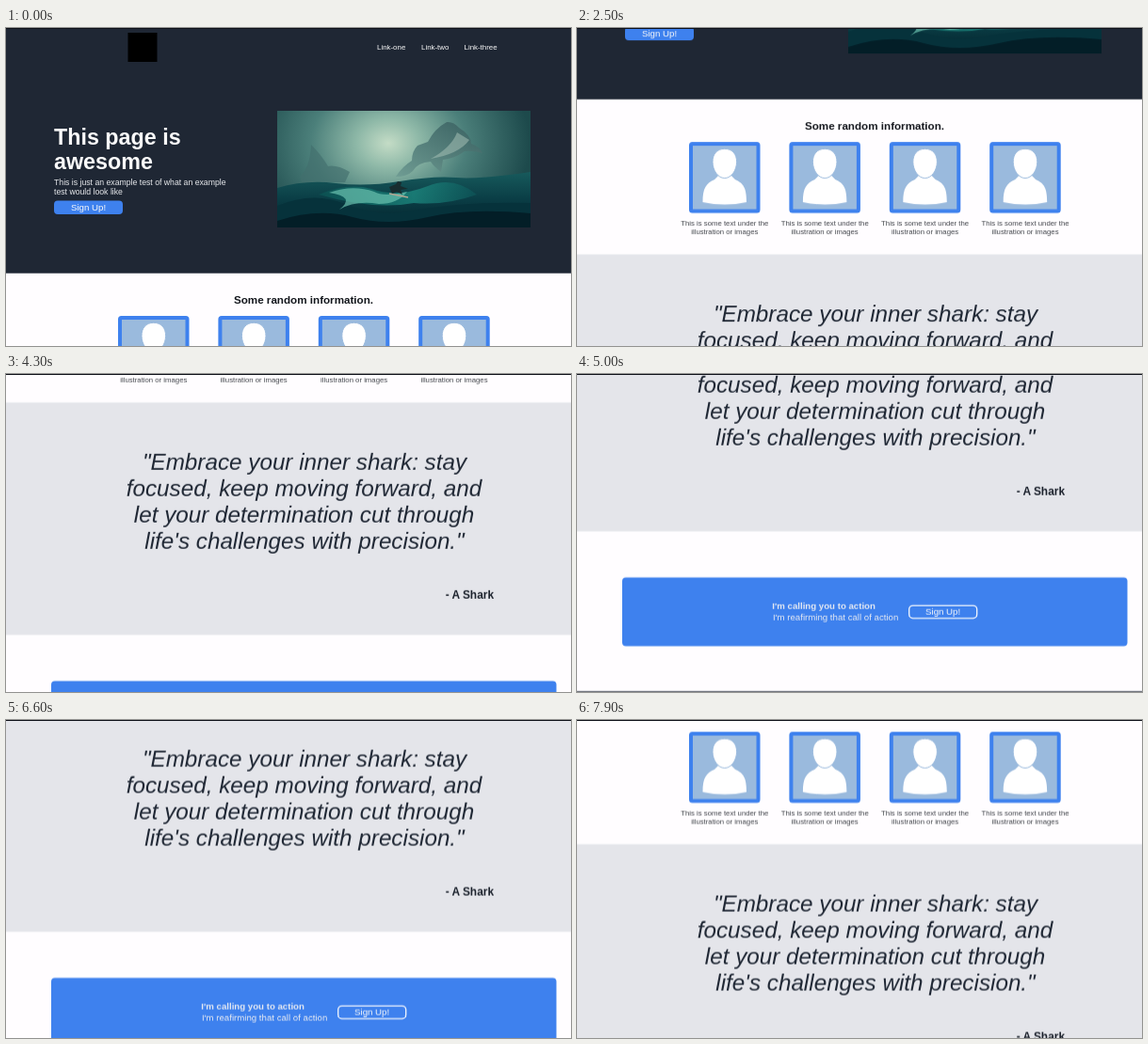
These frames come from a looping animation (600 px wide and 338 px high, 8 s). An HTML page:

```html
<!DOCTYPE html>
<html lang="en">
<head>
<meta charset="utf-8">
<title>Scrolling landing page</title>
<style>
  html, body { margin: 0; width: 100%; height: 100%; overflow: hidden; background: #fffdff; }
  #stage { position: relative; width: 600px; height: 338px; overflow: hidden; }
  #page { display: block; will-change: transform; }
  #edge { position: absolute; inset: 0 0 auto; height: 1px; background: #0e1119; }
  text { font-family: "Liberation Sans", Arial, sans-serif; }
  .light { fill: #fafafa; }
  .mid { text-anchor: middle; }
  .bold { font-weight: bold; }
  .small { font-size: 7.9px; }
  .title { font-size: 23.3px; }
  .lead { font-size: 8.7px; fill: #e8eaed; }
  .button { font-size: 9.7px; }
  .heading { font-size: 11.65px; fill: #14171d; }
  .caption { font-size: 7.75px; fill: #41444a; }
  .quote { font-size: 24.25px; font-style: italic; fill: #1f2734; }
  .author { font-size: 11.9px; text-anchor: end; fill: #1a202b; }
  .call { font-size: 9.66px; fill: #e5e9f2; }
  .footer { font-size: 7.75px; }
</style>
</head>
<body>
<div id="stage">
<svg id="page" width="600" height="882" viewBox="0 0 600 882">
  <defs>
    <radialGradient id="sky" gradientUnits="userSpaceOnUse" cx="118" cy="34" r="150" gradientTransform="translate(0 8) scale(1 .78)">
      <stop offset="0" stop-color="#c4dcc6"/>
      <stop offset=".22" stop-color="#8fb9a8"/>
      <stop offset=".55" stop-color="#4b7f7a"/>
      <stop offset="1" stop-color="#1d4a4c"/>
    </radialGradient>
    <linearGradient id="sea" x1="0" y1="0" x2="0" y2="1">
      <stop offset="0" stop-color="#175a5c"/>
      <stop offset=".5" stop-color="#0a3d45"/>
      <stop offset="1" stop-color="#04222b"/>
    </linearGradient>
    <linearGradient id="shark" x1="0" y1="1" x2="1" y2="0">
      <stop offset="0" stop-color="#6f9c93"/>
      <stop offset="1" stop-color="#385f60"/>
    </linearGradient>
    <linearGradient id="wave" x1="0" y1="0" x2="1" y2="0">
      <stop offset="0" stop-color="#0b5554"/>
      <stop offset=".6" stop-color="#1f9186"/>
      <stop offset="1" stop-color="#0d5558"/>
    </linearGradient>
    <clipPath id="frame"><rect width="269" height="124"/></clipPath>
    <g id="avatar">
      <rect x="2" y="2" width="71.5" height="71.5" rx="1.5" fill="#9abadd" stroke="#3e81ee" stroke-width="4"/>
      <path d="M14.5 64C14.5 49 18 44 27 40L31 36H45L49 40C58 44 61 49 61 64Q38 69 14.5 64Z" fill="#fff"/>
      <path d="M37.8 7.3C46 7.3 50.8 13 50.6 21.5C50.4 30 45 38.5 37.8 38.5S25.2 30 25 21.5C24.8 13 29.6 7.3 37.8 7.3Z" fill="#fff" stroke="#9abadd"/>
    </g>
  </defs>

  <rect width="600" height="882" fill="#fffdff"/>
  <rect width="600" height="260.7" fill="#1f2734"/>
  <rect x="129.5" y="5" width="31" height="31" fill="#000"/>
  <g class="small light">
    <text x="394" y="23">Link-one</text>
    <text x="441" y="23">Link-two</text>
    <text x="486.5" y="23">Link-three</text>
  </g>
  <g class="title bold light">
    <text x="51" y="123.7">This page is</text>
    <text x="51" y="150.3">awesome</text>
  </g>
  <text class="lead" x="51" y="167">This is just an example test of what an example</text>
  <text class="lead" x="51" y="177">test would look like</text>
  <rect x="51" y="183.5" width="73" height="14.5" rx="4" fill="#3e81ee"/>
  <text class="button mid light" x="87.5" y="194.2">Sign Up!</text>

  <g transform="translate(288 88)" clip-path="url(#frame)">
    <rect width="269" height="124" fill="url(#sky)"/>
    <path d="M24 70Q35 60 36 36Q47 47 54 59Q63 57 77 65L72 76H26Z" fill="#426f6d" opacity=".65"/>
    <path d="M126 70Q133 59 143 53Q143 43 149 37L160 33Q167 19 180 12Q187 11 193 18Q206 26 206 35Q215 38 218 45Q207 42 199 43Q188 51 176 52L174 65Q166 59 163 54Q149 55 144 64Q138 70 126 70Z" fill="url(#shark)"/>
    <path d="M204 31Q193 46 163 51Q185 39 191 23Z" fill="#a5bfb5" opacity=".55"/>
    <path d="M0 82Q30 73 62 77T130 75T190 71T269 65V124H0Z" fill="url(#sea)"/>
    <path d="M44 89Q75 76 100 83Q127 93 160 80Q187 69 212 89Q179 101 145 98Q103 106 44 89Z" fill="url(#wave)" opacity=".7"/>
    <path d="M0 101Q38 85 72 99T139 107T204 99T269 98V124H0Z" fill="#06323b"/>
    <path d="M55 87Q80 78 103 86Q113 92 138 86Q128 99 108 99Q83 95 66 105Q84 91 55 87Z" fill="#70c9b5" opacity=".65"/>
    <path d="M0 117Q43 103 80 113T160 113T269 109V124H0Z" fill="#031e27"/>
    <path d="M119 81L126 78L128 75L132 76L131 80L139 83L131 84L133 89L127 86L122 88Z" fill="#182d2f"/>
    <path d="M119 88L139 92" stroke="#b6a692" stroke-width="1.5"/>
  </g>

  <text class="heading bold mid" x="316" y="293">Some random information.</text>
  <g id="cards"></g>

  <rect y="425.5" width="600" height="247" fill="#e4e5ea"/>
  <g class="quote mid">
    <text x="317" y="496.7">"Embrace your inner shark: stay</text>
    <text x="316.5" y="524.8">focused, keep moving forward, and</text>
    <text x="316.5" y="552.8">let your determination cut through</text>
    <text x="317" y="580.9">life's challenges with precision."</text>
  </g>
  <text class="author bold" x="518" y="633.8">- A Shark</text>

  <rect x="48" y="721.5" width="536.5" height="73" rx="4" fill="#3e81ee"/>
  <text class="call bold" x="207.3" y="754.8">I'm calling you to action</text>
  <text class="call" x="208" y="766.8">I'm reafirming that call of action</text>
  <rect x="352.7" y="751.3" width="72" height="13.5" rx="4" fill="none" stroke="#f4f7fd" stroke-width="1.3"/>
  <text class="button mid light" x="388.6" y="761.3">Sign Up!</text>

  <rect y="842.5" width="600" height="39.5" fill="#1f2734"/>
  <text class="footer mid light" x="316.2" y="864.5">Copyright @ Me, myself and I 2023</text>
</svg>
<div id="edge"></div>
</div>
<script>
  const LOOP = 8000, TICK = 100;
  // Each scroll: start time, number of ticks, resting offset.
  const scrolls = [
    [300, 7, 37.5], [1500, 8, 168], [2400, 7, 290], [3600, 8, 395.2],
    [4600, 8, 543.5], [6300, 7, 395.5], [7400, 7, 290.5]
  ];
  const page = document.getElementById('page');

  document.getElementById('cards').innerHTML = [0, 1, 2, 3].map(i => `
    <g transform="translate(${119 + i * 106.4} 306)">
      <use href="#avatar"/>
      <text class="caption mid" x="37.8" y="89.3">This is some text under the</text>
      <text class="caption mid" x="37.8" y="97.7">illustration or images</text>
    </g>`).join('');

  const ease = x => x < .5 ? (2 * x) ** 2.3 / 2 : 1 - (2 - 2 * x) ** 2.3 / 2;

  function offsetAt(time) {
    let offset = 0;
    for (const [start, ticks, rest] of scrolls) {
      if (time < start) break;
      const tick = Math.floor((time - start) / TICK) + 1;
      offset += (rest - offset) * ease(Math.min(1, tick / ticks));
    }
    return offset;
  }

  const began = performance.now();
  function draw() {
    const time = (performance.now() - began) % LOOP;
    page.style.transform = `translateY(${-offsetAt(time)}px)`;
    requestAnimationFrame(draw);
  }
  draw();
</script>
</body>
</html>
```
